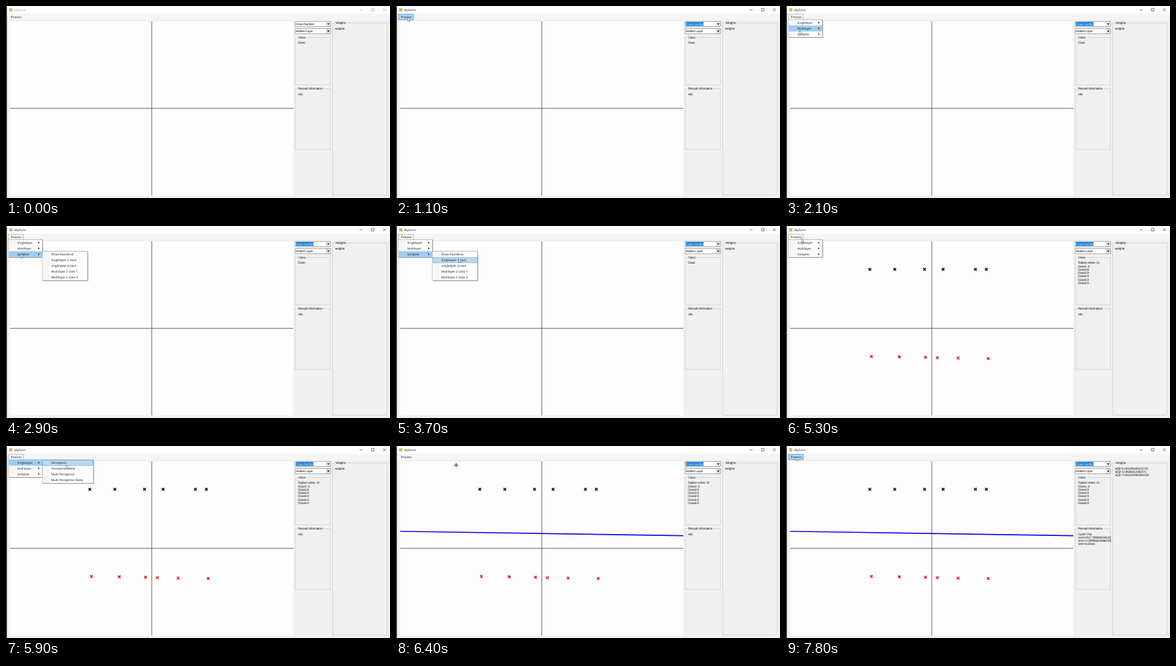
An HTML page for the animation above (8 s loop, 600x301 px).

```html
<!DOCTYPE html>
<html lang="en">
<head>
<meta charset="utf-8">
<title>MyForm</title>
<style>
  html, body { margin: 0; width: 100%; height: 100%; overflow: hidden; background: #f0f0f0; }
  svg { display: block; width: 600px; height: 301px; }
  text {
    font: 4.8px "Liberation Sans", Arial, sans-serif; letter-spacing: -.18px;
    text-rendering: geometricPrecision; white-space: pre;
  }
  .ui { font: 4.7px "Open Sans", "Noto Sans", sans-serif; letter-spacing: 0; }
</style>
</head>
<body>
<svg id="stage" viewBox="0 0 600 301"></svg>
<script>
const LOOP = 8000, STEP = 100, MOVE = 700;
const ROW = 9, LINE_HEIGHT = 5.25, INK = '#111';
const stage = document.getElementById('stage');

// Times at which the window changes state
const ACTIVE = 300, POINTS = 3800, LINE = 6400, RESULT = 6600;

const MAIN = ['Singlelayer', 'Multilayer', 'Samples'];
const SESSIONS = [
  { open: 1300, sub: 2500, close: POINTS, parent: 2, width: 70.5,
    items: ['Show Koordinat', 'Singlelayer 2 class', 'singlelayer 4 class', 'Multilayer 2 class 1', 'Multilayer 2 class 2'] },
  { open: 4800, sub: 5400, close: LINE, parent: 0, width: 79.5,
    items: ['Perceptron', 'Perceptron Delta', 'Multi Perceptron', 'Multi Perceptron Delta'] }
];

// Pointer stops; each is reached after an eased move of MOVE ms
const STOPS = [
  { at: 200, x: 60, y: 226 },
  { at: 900, x: 18, y: 18 },
  { at: 2300, x: 22, y: 44 },
  { at: 3600, x: 98, y: 51 },
  { at: 4600, x: 20, y: 19 },
  { at: 5900, x: 94, y: 30 },
  { at: 7200, x: 16, y: 17 }
];

const rect = (x, y, w, h, fill, stroke = 'none', sw = .6) =>
  `<rect x="${x}" y="${y}" width="${w}" height="${h}" fill="${fill}" stroke="${stroke}" stroke-width="${sw}"/>`;
const path = (d, stroke, sw = .6, fill = 'none') =>
  `<path d="${d}" fill="${fill}" stroke="${stroke}" stroke-width="${sw}"/>`;
// y is the middle of the line of text
const text = (x, y, s, cls = '', fill = INK) =>
  `<text x="${x}" y="${y + 1.6}" class="${cls}" fill="${fill}">${s}</text>`;
const lines = (x, y, list) => list.map((s, i) => text(x, y + i * LINE_HEIGHT, s)).join('');
// A row of crosses that sinks by slope from one to the next
const crosses = (xs, y, slope, color) =>
  path(xs.map((x, i) => `M${x - 2} ${y + i * slope - 2}l4 4m0-4l-4 4`).join(''), color, 1.5);

function pointer(t) {
  if (t < STOPS[0].at) return null;
  let { x, y } = STOPS[0];
  for (const stop of STOPS.slice(1)) {
    const u = Math.min(1, Math.max(0, (t - stop.at + MOVE) / MOVE));
    const e = u * u * (3 - 2 * u);
    x += (stop.x - x) * e;
    y += (stop.y - y) * e;
  }
  return { x, y };
}

const session = t => SESSIONS.find(s => t >= s.open && t < s.close);

function group(x, y, w, h, label, width) {
  return rect(x, y, w, h, 'none', '#c2c2c2') +
    rect(x + 3.5, y - 2, width, 4, '#f0f0f0') + text(x + 4.5, y - .3, label);
}

function combo(y, label, selected) {
  return rect(452, y, 55, 8, '#fff', '#777') +
    (selected ? rect(453, y + 1, 27.5, 6, '#0078d7') : '') +
    text(453, y + 4, label, '', selected ? '#fff' : INK) +
    rect(500.2, y + .6, 6.4, 6.8, '#ececec', '#999', .4) +
    path(`M501.6 ${y + 3}h4l-2 2.4z`, 'none', 0, INK);
}

function windowFrame(active) {
  const ink = active ? INK : '#999';
  return rect(0, 0, 600, 301, '#f0f0f0') + rect(0, 0, 600, 12, '#fff') + rect(0, 12, 600, 10, '#f5f5f5') +
    rect(0, 0, 1.3, 301, INK) + rect(5, 3.5, 5, 5, '#d8b468') +
    text(13, 6, 'MyForm', 'ui', ink) +
    path('M552.5 6h4.5M571 3.8h4v4h-4zM589.2 3.8l4.2 4.2m0-4.2l-4.2 4.2', ink) +
    rect(6.5, 24, 442.5, 273, '#fdfdfd') +
    path('M6.5 160.4H449M227.8 24V297', '#555', .9);
}

function panels(t) {
  return combo(24.2, 'Class Number', t >= ACTIVE) + combo(35.6, 'Hidden Layer', false) +
    group(452, 49.3, 55, 74.5, 'Class', 12.5) +
    group(452, 129.6, 55, 95.4, 'Ressult information', 38.5) +
    group(510.5, 26.7, 85, 269.8, 'Weights', 18) +
    lines(456, 57.8, t < POINTS ? ['Class'] :
      ['Toplam nokta: 12', 'Class1: 6', 'Class2:6', 'Class3:0', 'Class4:0', 'Class5:0', 'Class6:0']) +
    '<svg width="508" height="301">' + lines(456.5, 138, t < RESULT ? ['info'] :
      ['Cycle=744', 'norm=817.709606156122', 'error=0.099956434964780', 'time=0.02sec']) + '</svg>' +
    lines(514, 35, t < RESULT ? ['weights'] :
      ['w[0]=0.193190345215715', 'w[1]=12.8636312362271', 'w[2]=-0.911224461581318']);
}

function dropdown(x, y, w, items, hot, hotFill, hotEdge, arrows) {
  const h = items.length * ROW + .8;
  return rect(x + 1, y + 1, w, h, '#0005') + rect(x, y, w, h, '#fdfdfd', '#8c8c8c') +
    rect(x + .5, y + .5, 10.5, h - 1, '#f6f6f6') +
    items.map((s, i) => {
      const mid = y + 4.9 + i * ROW;
      return (i === hot ? rect(x + .8, mid - 4.2, w - 1.6, 8.5, hotFill, hotEdge, .5) : '') +
        text(x + 13.8, mid, s, 'ui') +
        (arrows ? path(`M${x + 46.5} ${mid - 1.6}l2 1.6l-2 1.6z`, 'none', 0, INK) : '');
    }).join('');
}

function menus(t, p) {
  const s = session(t);
  const over = p && p.x > 4 && p.x < 27 && p.y > 13 && p.y < 21.5;
  const label = text(7.6, 17, 'Process', 'ui');
  if (!s) return (over ? rect(4, 13, 23, 8.3, '#b3d7f3', '#0078d7') : '') + label;

  const row = top => Math.floor((p.y - top) / ROW);
  const subOpen = t >= s.sub, subTop = 21.6 + s.parent * ROW;
  return rect(4, 13, 23, 8.3, '#f8f8f8', '#8c8c8c') + label +
    dropdown(4, 21.2, 53, MAIN, subOpen ? s.parent : row(22), '#9ccdf5', '#86bfee', true) +
    (subOpen ? dropdown(57, subTop, s.width, s.items, p.x > 57 ? row(subTop) : -1, '#b9daf4', '#4a9bdc', false) : '');
}

function cursor(t, p) {
  if (!p) return '';
  if (!session(t) && p.x > 6.5 && p.y > 24)
    return path(`M${p.x - 3.5} ${p.y}h7m-3.5-3.5v7`, INK, .9);
  return path(`M${p.x} ${p.y}v6l1.4-1.2l.9 2.1l.9-.4l-.9-2h1.8z`, '#222', .4, '#fff');
}

function draw(t) {
  const p = pointer(t);
  stage.innerHTML = windowFrame(t >= ACTIVE) + panels(t) +
    (t >= POINTS ? crosses([131, 170, 216.5, 245.5, 296, 313], 67.9, 0, INK) +
      crosses([133.5, 177, 218, 236.5, 269, 316], 204.5, .65, '#d8101c') : '') +
    (t >= LINE ? path('M6.5 133.8L449 140.6', '#0a0ae0', 1.6) : '') +
    menus(t, p) + cursor(t, p);
}

const start = performance.now();
let shown = -1;
function tick() {
  const t = Math.floor((performance.now() - start) % LOOP / STEP) * STEP;
  if (t !== shown) draw(shown = t);
  requestAnimationFrame(tick);
}
tick();
</script>
</body>
</html>
```
